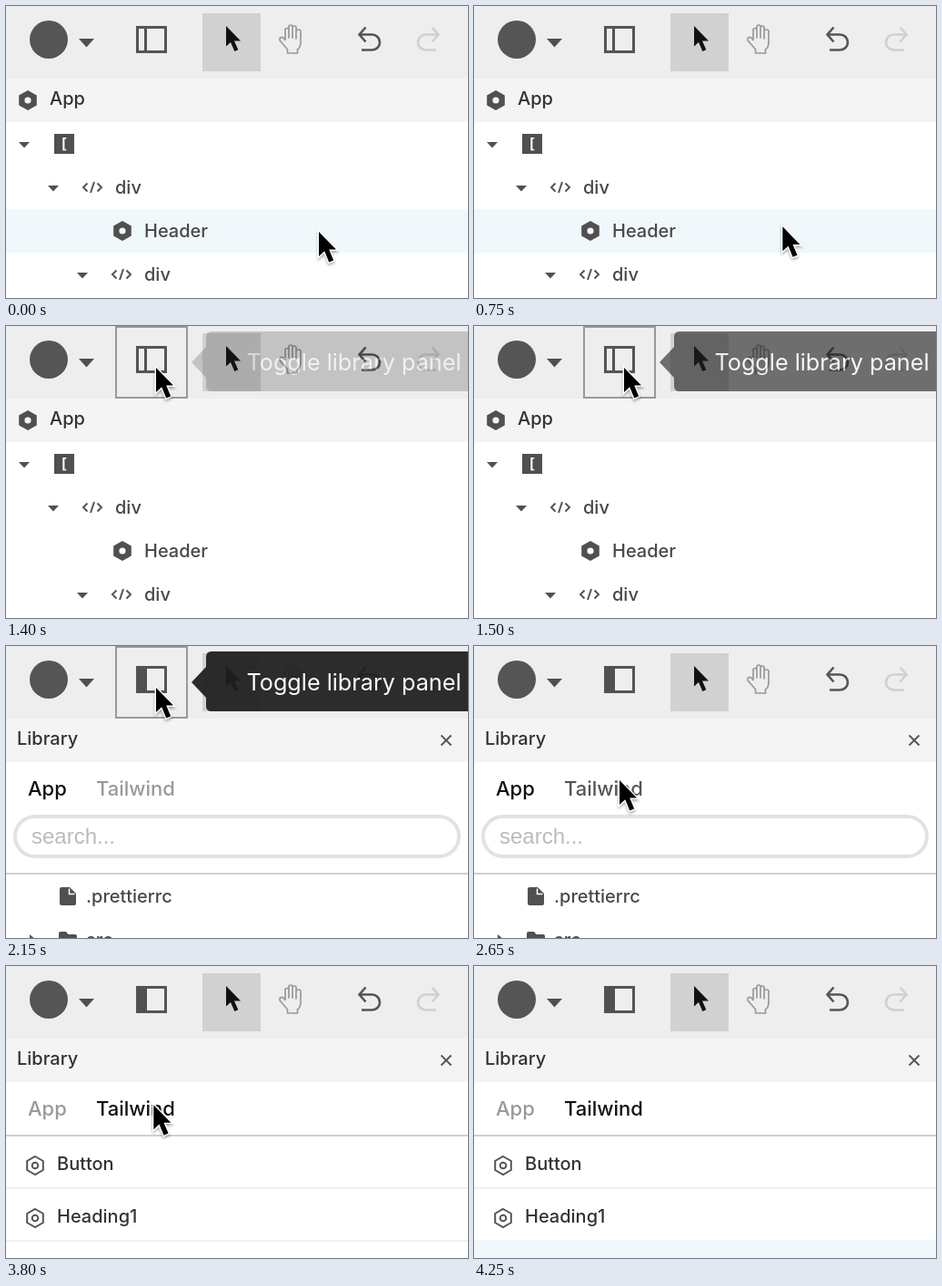
These frames come from a looping animation (508 by 322 pixels, 5.6 s). An HTML page:

```html
<!DOCTYPE html>
<html lang="en">
<head>
<meta charset="utf-8">
<title>Library panel</title>
<style>
  html, body { margin: 0; width: 100%; height: 100%; overflow: hidden; background: #fff; }
  svg { display: block; width: 100vw; height: 100vh; }
  text { font: 500 20px Inter, sans-serif; fill: #484848; }
  .title { fill: #333; }
  .tab { font-size: 22px; fill: #999; }
  .tab.hover { fill: #555; }
  .tab.active { fill: #111; }
  .search { font: 24px "Liberation Sans", Arial, sans-serif; fill: #bbb; }
  .tip { font-size: 25.2px; font-weight: 400; fill: #fff; }
  .bracket { font: bold 16px "DejaVu Sans Mono", monospace; fill: #fff; }
  .line { fill: none; stroke: #555; stroke-width: 2; }
  .dark { fill: #505050; }
  .row { fill: #f0f8fc; }
</style>
</head>
<body>
<svg viewBox="0 0 508 322" preserveAspectRatio="none">
  <defs>
    <path id="hex" d="M0-11 9.8-5.5V5.5L0 11-9.8 5.5V-5.5ZM0-3.6A3.6 3.6 0 0 0 0 3.6 3.6 3.6 0 0 0 0-3.6Z" fill-rule="evenodd"/>
    <g id="part" class="line"><path d="M0-10 8.8-5V5L0 10-8.8 5V-5Z"/><circle r="3.3"/></g>
    <path id="caret" d="M-6-3H6L0 3.5Z"/>
    <path id="code" class="line" d="M-5.5-4.5-10 0-5.5 4.5M5.5-4.5 10 0 5.5 4.5M2-6-2 6"/>
    <g id="undo" fill="none" stroke-width="2.6"><path d="M395.500 23.500 388.500 31.500 395.500 39.500M389 31.500H402.500A8.500 8.500 0 0 1 402.500 48.500H391"/></g>
    <filter id="shadow" x="-50%" y="-50%" width="200%" height="200%">
      <feDropShadow dx="0" dy="2" stdDeviation="1.6" flood-opacity=".35"/>
    </filter>
  </defs>

  <rect width="508" height="322" fill="#fff"/>

  <g id="toolbar">
    <rect width="508" height="80" fill="#eee"/>
    <circle cx="47" cy="37" r="21" fill="#555"/>
    <path class="dark" d="M80 36H97L88.500 45.500Z"/>
    <rect id="focus" x="121" y="1" width="78" height="78" fill="none" stroke="#999" stroke-width="2"/>
    <rect class="line" x="144.500" y="23.500" width="31" height="27" style="stroke-width:3"/>
    <path class="line" d="M153.500 23V51" style="stroke-width:3"/>
    <rect id="filled" class="dark" x="144" y="23" width="11" height="28"/>
    <rect x="216" y="8" width="64" height="64" fill="#d1d1d1"/>
    <path d="M242 22V44.500L247 40 251.300 50 255.300 48.300 251 38.500H258Z" fill="#111"/>
    <path class="line" style="stroke:#999;stroke-width:1.7;stroke-linejoin:round" d="M308 46 301.500 38.500Q300 35.500 302.500 34.500 304.500 34 307 37.500V26.500Q307 24.500 309 24.500T311 26.500V35 23Q311 21 313 21T315 23V35 24Q315 22 317 22T319 24V36 28Q319 26 321.500 26T324 28V41Q323.500 46 320.500 48V52H309.500V48Z"/>
    <use href="#undo" stroke="#555"/>
    <use href="#undo" stroke="#d0d0d0" transform="matrix(-1 0 0 1 864 0)"/>
  </g>

  <rect y="80" width="508" height="48" fill="#f4f4f4"/>

  <g id="tree">
    <rect id="treeRow" class="row" width="508" height="48"/>
    <use href="#hex" class="dark" x="24" y="104"/>
    <text class="title" x="48" y="109">App</text>
    <use href="#caret" class="dark" x="20" y="153"/>
    <rect class="dark" x="53" y="141" width="22" height="22"/>
    <text class="bracket" x="59" y="157">[</text>
    <use href="#caret" class="dark" x="52" y="201"/>
    <use href="#code" x="95" y="200"/>
    <text x="120" y="207">div</text>
    <use href="#hex" class="dark" x="128" y="248"/>
    <text x="152" y="255">Header</text>
    <use href="#caret" class="dark" x="84" y="297"/>
    <use href="#code" x="127" y="296"/>
    <text x="152" y="303">div</text>
  </g>

  <g id="library">
    <text class="title" x="12" y="109">Library</text>
    <path class="line" d="M478.500 98.500 489.500 109.500M489.500 98.500 478.500 109.500" style="stroke-width:1.8"/>
    <text id="appTab" class="tab" x="24" y="165">App</text>
    <text id="twTab" class="tab" x="99" y="165">Tailwind</text>
    <g id="files">
      <rect x="10" y="188" width="488" height="44" rx="22" fill="#fff" stroke="#e2e2e2" stroke-width="4"/>
      <text class="search" x="28" y="218">search...</text>
      <rect y="250" width="508" height="2" fill="#d0d0d0"/>
      <path class="dark" d="M61 266H70L77 273V284Q77 286 75 286H61Q59 286 59 284V268Q59 266 61 266Z"/>
      <path d="M69.500 267.500V273.500H75.500" fill="none" stroke="#fff" stroke-width="1.5"/>
      <text x="88" y="283">.prettierrc</text>
      <path class="dark" d="M26 318 33 324 26 330Z"/>
      <path class="dark" d="M60 315H66L68.500 318H76Q78 318 78 320V332H58V317Q58 315 60 315Z"/>
      <text x="88" y="331">src</text>
    </g>
    <g id="parts">
      <rect id="partRow" class="row" width="508" height="58"/>
      <rect y="186" width="508" height="2" fill="#d0d0d0"/>
      <path d="M0 245H508M0 303H508" stroke="#f0f0f0" stroke-width="2"/>
      <use href="#part" x="32" y="220"/>
      <text class="title" x="56" y="225">Button</text>
      <use href="#part" x="32" y="278"/>
      <text class="title" x="56" y="283">Heading1</text>
      <rect id="lastRow" class="row" y="302" width="508" height="20"/>
    </g>
  </g>

  <g id="tooltip">
    <path d="M204 40 220 23V12Q220 6 226 6H508V72H226Q220 72 220 66V57Z" fill="#1e1e1e"/>
    <text class="tip" x="264.500" y="49">Toggle library panel</text>
  </g>

  <g id="cursor" filter="url(#shadow)">
    <path d="M0 0V27L6.200 21.300 11.200 33.500 16.200 31.400 11.200 19.600H19Z" fill="#000" stroke="#fff" stroke-width="2.600" paint-order="stroke"/>
  </g>
</svg>

<script>
const LOOP = 5600, STEP = 50;
const $ = id => document.getElementById(id);
const show = (id, on) => { $(id).style.display = on ? '' : 'none'; };
const clamp = v => Math.max(0, Math.min(1, v));
const smooth = p => p * p * (3 - 2 * p);

// Cursor stops: time, x, y, easing into the stop
const line = p => p;
const stops = [
  [0, 344, 249, line],
  [700, 344, 249, line],
  [850, 302, 198, p => p * p],
  [1000, 205, 88, line],
  [1050, 160, 56, line],
  [1100, 109, 42, line],
  [1150, 138, 43, line],
  [1200, 165, 46, line],
  [2250, 165, 46, line],
  [2650, 160, 148, smooth],
  [3750, 161, 148, line],
  [4250, 208, 334, smooth],
  [LOOP, 208, 334, line]
];

function cursorAt(t) {
  const i = stops.findIndex(s => s[0] > t);
  const a = stops[i - 1], b = stops[i];
  const p = b[3]((t - a[0]) / (b[0] - a[0]));
  return [a[1] + (b[1] - a[1]) * p, a[2] + (b[2] - a[2]) * p];
}

function tipOpacity(t) {
  if (t < 1400 || t >= 2450) return 0;
  if (t < 1550) return 0.2 + (t - 1400) / 100 * 0.41;
  return 0.93 * (1 - clamp((t - 2250) / 200));
}

function highlight(id, y, top, height, from, to) {
  const n = Math.floor((y - top) / height);
  show(id, y >= from && y < to);
  $(id).setAttribute('y', top + n * height);
}

function draw(now) {
  const t = Math.floor(now % LOOP / STEP) * STEP;
  const [x, y] = cursorAt(t);
  const open = t >= 1550, tailwind = t >= 3000;
  const overTab = x > 90 && x < 196 && y > 130 && y < 186;

  $('cursor').setAttribute('transform', `translate(${x} ${y})`);
  $('tooltip').setAttribute('opacity', tipOpacity(t));
  show('focus', x > 120 && x < 200 && y < 80);
  show('filled', open);
  show('tree', !open);
  show('library', open);
  show('files', !tailwind);
  show('parts', tailwind);
  highlight('treeRow', y, 128, 48, 128, 322);
  highlight('partRow', y, 187, 58, 187, 303);
  show('lastRow', y >= 303);
  $('appTab').classList.toggle('active', !tailwind);
  $('twTab').classList.toggle('active', tailwind);
  $('twTab').classList.toggle('hover', overTab && !tailwind);
}

const start = performance.now();
function tick() {
  draw(performance.now() - start);
  requestAnimationFrame(tick);
}
tick();
</script>
</body>
</html>
```
